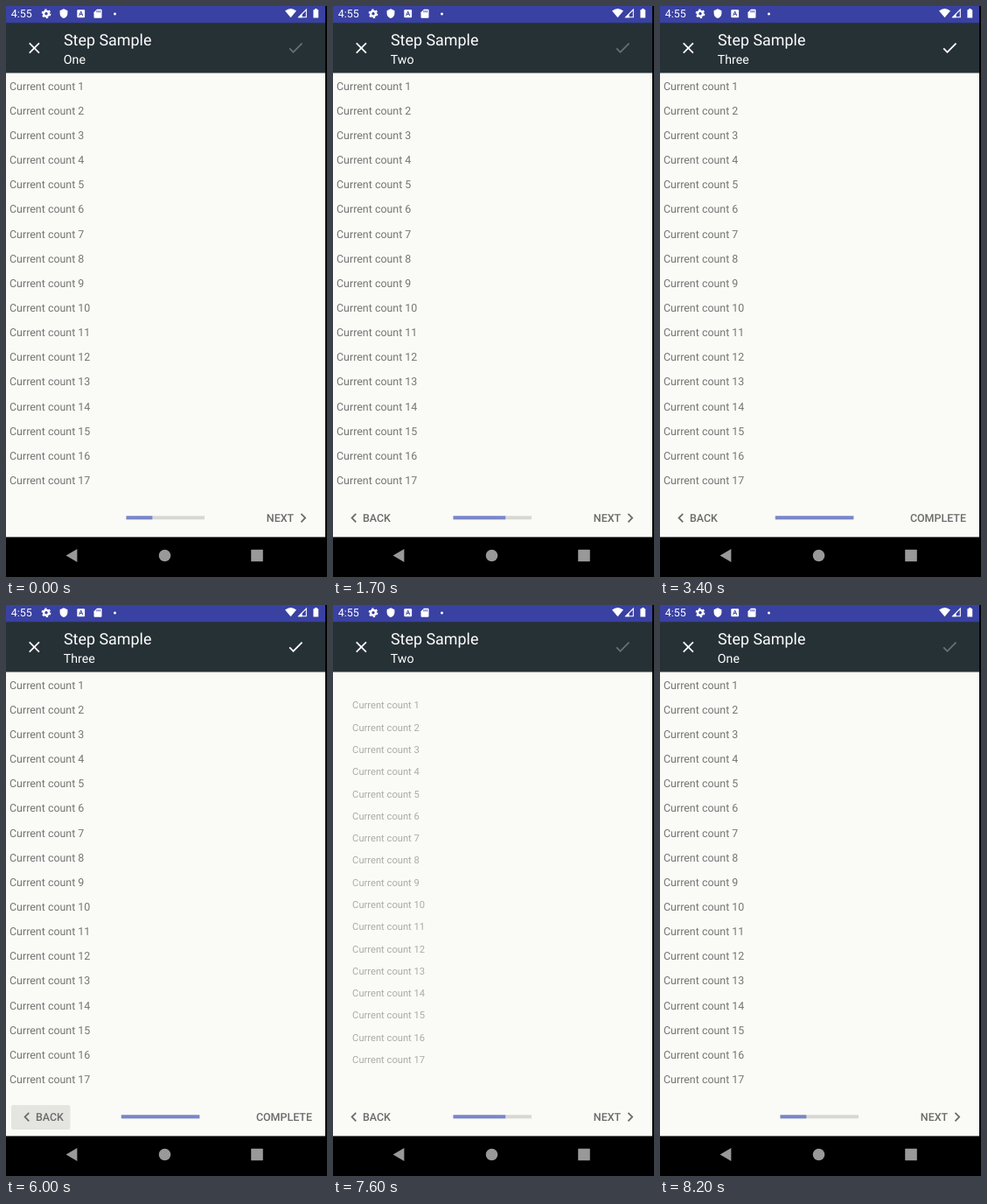
Recreate the animation shown at these times as an HTML page. Size 367x652 px, loop 10 s.

```html
<!DOCTYPE html>
<html lang="en">
<head>
<meta charset="utf-8">
<title>Step Sample</title>
<style>
  html, body { margin: 0; width: 100%; height: 100%; overflow: hidden; background: #000; }
  svg { display: block; width: 367px; height: 652px; }
  text { font-family: Roboto, sans-serif; font-size: 12.44px; text-rendering: geometricPrecision; white-space: pre; }
  .white { fill: #fff; }
  .row { fill: #757575; }
  .button text { font-weight: 500; }
  .button { fill: #6b6b6b; }
  .press { fill: #e4e4e1; }
</style>
</head>
<body>
<svg viewBox="0 0 367 652">
  <defs>
    <clipPath id="viewport"><rect y="77" width="365" height="486"/></clipPath>
  </defs>
  <rect width="365" height="606.4" fill="#fafaf6"/>
  <rect width="365" height="76.5" fill="#263136"/>
  <rect width="365" height="19.3" fill="#3941a2"/>

  <!-- Status bar -->
  <g class="white">
    <text x="5.8" y="13.4">4:55</text>
    <g fill="none" stroke="#fff">
      <circle cx="46" cy="8.8" r="2.9" stroke-width="2.4"/>
      <circle cx="46" cy="8.8" r="4.6" stroke-width="1.6" stroke-dasharray="2.4 2.417"/>
    </g>
    <path d="M66 3.3l4.4 1.9v3.2c0 2.7-1.8 4.9-4.4 5.7-2.6-.8-4.4-3-4.4-5.7V5.2z"/>
    <rect x="81.3" y="4.2" width="8.8" height="9" rx="1"/>
    <path d="M83.7 11l2-4.9 2 4.9m-3.3-1.6h2.6" fill="none" stroke="#3941a2"/>
    <path d="M104 3.7h4.5q1 0 1 1v8q0 1-1 1h-7q-1 0-1-1V7.2z"/>
    <path d="M103.9 5.2v2.2m1.8-2.2v2.2m1.8-2.2v2.2" stroke="#3941a2" stroke-width=".9"/>
    <circle cx="124.5" cy="8.9" r="1.5"/>
    <path d="M325.5 13.3L319 5.4q6.5-5 13 0z"/>
    <path d="M343.3 4.2v8.6h-8.6z" fill="none" stroke="#fff" stroke-width="1.1"/>
    <path d="M334 13.3l4.6-4.6v4.6z"/>
    <path d="M353 3h2.6v1.2h1.6v9.4h-5.8V4.2h1.6z"/>
  </g>

  <!-- App bar -->
  <g class="white">
    <path transform="translate(21.7 37.3) scale(.888)" d="M19 6.41L17.59 5 12 10.59 6.41 5 5 6.41 10.59 12 5 17.59 6.41 19 12 13.41 17.59 19 19 17.59 13.41 12z"/>
    <text x="66" y="45.2" style="font-size:17.9px">Step Sample</text>
    <text id="subtitle" x="65.8" y="65.9" style="font-size:14.2px"></text>
    <path id="check" transform="translate(320.5 37.1) scale(.888)" d="M9 16.17L4.83 12l-1.42 1.41L9 19 21 7l-1.41-1.41z"/>
  </g>

  <g id="pages" clip-path="url(#viewport)"></g>

  <!-- Bottom bar -->
  <rect id="backPress" class="press" x="6" y="571" width="67.5" height="28" rx="2"/>
  <rect id="nextPress" class="press" x="291" y="571" width="66.5" height="28" rx="2"/>
  <g id="back" class="button">
    <path transform="translate(13.2 573.9) scale(.888)" d="M15.41 7.41L14 6l-6 6 6 6 1.41-1.41L10.83 12z"/>
    <text x="34" y="589.4">BACK</text>
  </g>
  <g id="next" class="button">
    <text x="297.8" y="589.4">NEXT</text>
    <path transform="translate(329.2 573.9) scale(.888)" d="M10 6L8.59 7.41 13.17 12l-4.58 4.59L10 18l6-6z"/>
  </g>
  <g id="complete" class="button"><text x="285.9" y="589.4">COMPLETE</text></g>
  <g id="progress">
    <rect y="582.3" width="89.5" height="4" fill="#d7d7d5"/>
    <rect id="fill" y="582.3" height="4" fill="#7986cb"/>
  </g>

  <!-- Navigation bar -->
  <g fill="#999">
    <path d="M68.6 627.5l12.8-7.4v14.8z"/>
    <circle cx="181.5" cy="627.5" r="6.8"/>
    <rect x="280.2" y="620.7" width="13.6" height="13.6" rx=".6"/>
  </g>
</svg>
<script>
  const LOOP = 10000, FRAME = 100, WIDTH = 365, CENTER_X = 182.5, CENTER_Y = 320, ROW_HEIGHT = 28.14;
  const names = ['One', 'Two', 'Three'];

  // Three button taps, then a swipe back to the first page.
  const moves = [
    { press: 1300, start: 1500, frames: 3, to: 1, button: 'next' },
    { press: 3100, start: 3300, frames: 2, to: 2, button: 'next' },
    { press: 6000, start: 6300, frames: 3, to: 1, button: 'back' },
    { start: 7600, frames: 7, to: 0 }
  ];

  const el = id => document.getElementById(id);
  const show = (id, on) => el(id).setAttribute('visibility', on ? 'visible' : 'hidden');
  const easeOut = u => 1 - (1 - u) ** 3.38;

  const rows = Array.from({ length: 17 }, (_, i) =>
    `<text class="row" x="4" y="${95.7 + ROW_HEIGHT * i}">Current count ${i + 1}</text>`).join('');
  el('pages').innerHTML = names.map(() => `<g>${rows}</g>`).join('');
  const pages = [...el('pages').children];

  // The pager moves in whole frames, already under way on the first one.
  function positionAt(time) {
    let position = 0;
    for (const { start, frames, to } of moves) {
      if (time < start) break;
      const frame = Math.floor((time - start) / FRAME) + 1;
      position += (to - position) * easeOut(Math.min(1, frame / frames));
    }
    return position;
  }

  // Earlier pages slide away to the left; later ones shrink and fade in place.
  function placePage(page, offset) {
    const depth = Math.min(1, Math.max(0, offset));
    const scale = 1 - .25 * depth;
    const x = Math.min(0, offset) * WIDTH + CENTER_X * (1 - scale);
    page.setAttribute('transform', `translate(${x} ${CENTER_Y * (1 - scale)}) scale(${scale})`);
    page.setAttribute('opacity', 1 - depth);
  }

  function draw(time) {
    const position = positionAt(time);
    const step = Math.round(position);
    const last = step === names.length - 1;
    const pressed = moves.find(m => time >= m.press && time < m.start)?.button;

    pages.forEach((page, i) => placePage(page, i - position));
    el('subtitle').textContent = names[step];
    el('check').setAttribute('opacity', last ? 1 : .3);
    show('back', step > 0);
    show('next', !last);
    show('complete', last);
    show('nextPress', pressed === 'next');
    show('backPress', pressed === 'back');
    el('progress').setAttribute('transform', `translate(${last ? 131.8 : 137.5} 0)`);
    el('fill').setAttribute('width', 89.5 * (step + 1) / names.length);
  }

  const start = performance.now();
  function tick() {
    draw((performance.now() - start) % LOOP);
    requestAnimationFrame(tick);
  }
  tick();
</script>
</body>
</html>
```
